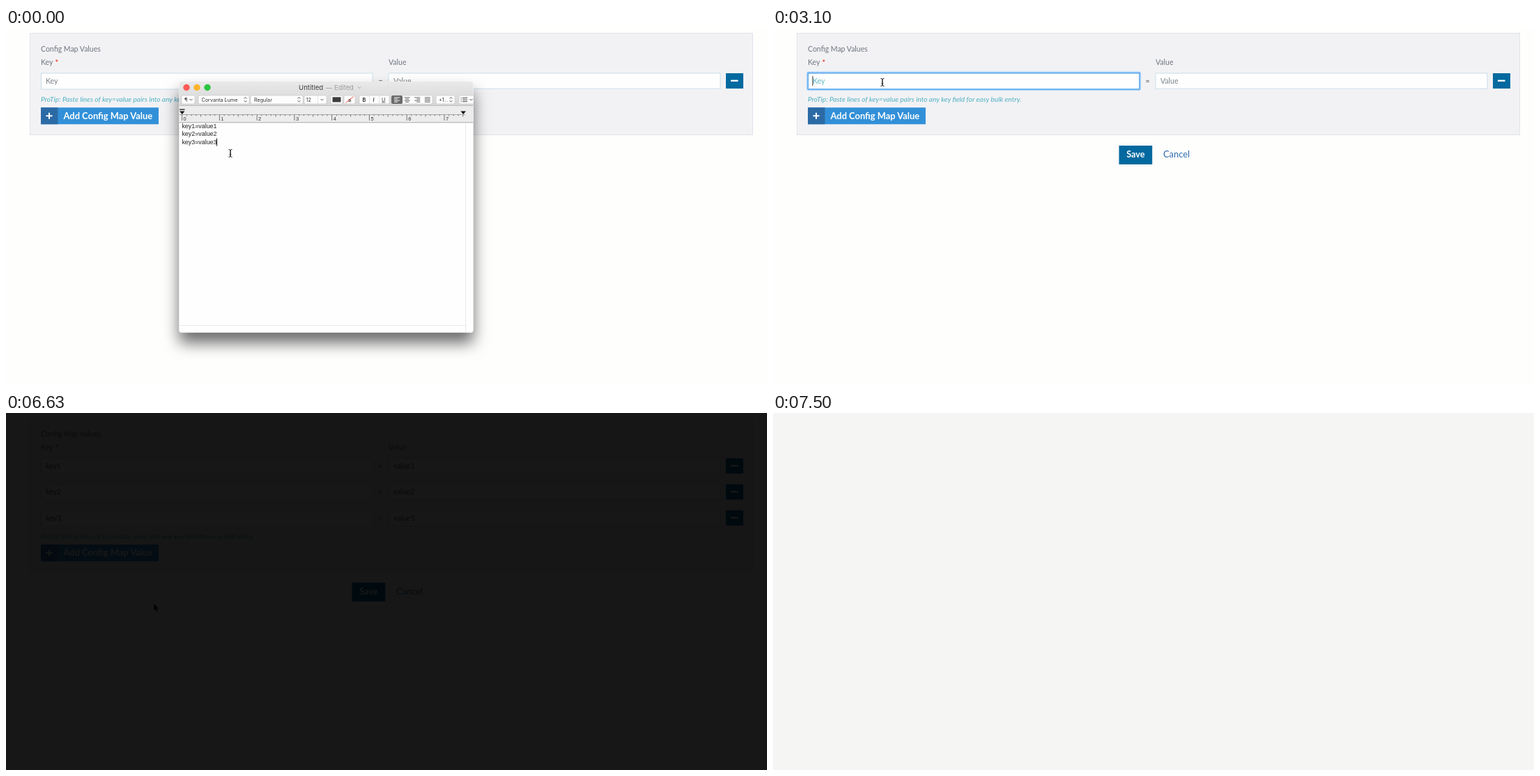
These frames come from a looping animation (1092 px wide and 513 px high, 7530 ms). An HTML page:

```html
<!DOCTYPE html>
<html lang="en">
<head>
<meta charset="utf-8">
<title>Config Map Values</title>
<style>
html, body { margin: 0; width: 100%; height: 100%; overflow: hidden; background: #fefefd; }
svg { display: block; width: 100%; height: 100%; }
text { white-space: pre; }
.web { font-family: Lato, "Open Sans", sans-serif; }
.mac { font-family: Inter, Roboto, sans-serif; }
.doc { font-family: "Liberation Sans", Arial, sans-serif; }
</style>
</head>
<body>
<svg id="stage" viewBox="0 0 1092 513" preserveAspectRatio="none">
  <defs>
    <filter id="winShadow" x="-20%" y="-20%" width="140%" height="150%">
      <feDropShadow dx="0" dy="15" stdDeviation="11" flood-opacity=".58"/>
    </filter>
    <filter id="menuShadow" x="-20%" y="-20%" width="140%" height="150%">
      <feDropShadow dx="0" dy="3" stdDeviation="3" flood-opacity=".3"/>
    </filter>
    <linearGradient id="bar" x1="0" y1="0" x2="0" y2="1">
      <stop offset="0" stop-color="#e9e9e9"/><stop offset="1" stop-color="#d6d6d6"/>
    </linearGradient>
    <clipPath id="winClip"><rect x="248.5" y="77" width="422" height="360.5" rx="4"/></clipPath>
  </defs>
</svg>
<script>
const LOOP = 7530, NS = 'http://www.w3.org/2000/svg';
const stage = document.getElementById('stage');

function el(parent, tag, attrs = {}, content) {
  const e = document.createElementNS(NS, tag);
  for (const k in attrs) e.setAttribute(k, attrs[k]);
  if (content != null) e.textContent = content;
  return parent.appendChild(e);
}
const group = (p, a) => el(p, 'g', a);
const rect = (p, x, y, w, h, fill, more) => el(p, 'rect', { x, y, width: w, height: h, fill, ...more });
const path = (p, d, stroke, width = 1, more) =>
  el(p, 'path', { d, fill: 'none', stroke, 'stroke-width': width, ...more });
const label = (p, cls, x, y, size, fill, str, more) =>
  el(p, 'text', { class: cls, x, y, 'font-size': size, fill, ...more }, str);
const show = (e, on) => e.setAttribute('visibility', on ? 'visible' : 'hidden');
const fade = (e, v) => { e.setAttribute('opacity', v); show(e, v > 0); };
const shift = (e, x, y) => e.setAttribute('transform', `translate(${x} ${y})`);
const clamp = (v, a = 0, b = 1) => Math.min(b, Math.max(a, v));

// ---- web form ----
rect(stage, 0, 0, 1092, 513, '#fefefd');
const panel = rect(stage, 34.5, 7.5, 1037, 146, '#f2f2f5', { stroke: '#dfe4e8' });
const gray = '#6f757e';
label(stage, 'web', 50, 34, 10.5, gray, 'Config Map Values');
label(stage, 'web', 50, 53.3, 10.5, gray, 'Key');
label(stage, 'web', 70.5, 54, 11, '#e8412f', '*', { 'font-weight': 700 });
label(stage, 'web', 549, 53.3, 10.5, gray, 'Value');

const rows = [0, 1, 2].map(i => {
  const g = group(stage, { transform: `translate(0 ${i * 37.4})` });
  const box = { stroke: '#c9dfe8' };
  rect(g, 50.5, 65, 475.5, 23, '#fefefe', box);
  rect(g, 549, 65, 476, 22.3, '#fefefe', box);
  label(g, 'web', 534.5, 79.8, 10.5, '#555', '=');
  rect(g, 1033, 65, 25, 22, '#03699f');
  rect(g, 1040, 74.6, 10.5, 2.3, '#fff');
  return {
    g,
    key: label(g, 'web', 57, 79.8, 10.5, '#555', 'key' + (i + 1)),
    value: label(g, 'web', 556, 80, 10.5, '#555', 'value' + (i + 1))
  };
});
const focus = group(stage);
rect(focus, 49.6, 64, 477, 24.6, 'none', { stroke: '#a9d2fa', 'stroke-width': 3, rx: 1.5 });
rect(focus, 50.3, 64.7, 475.6, 23.2, 'none', { stroke: '#58a6ee', 'stroke-width': 1.3 });
const fieldCaret = rect(stage, 56.4, 69, 1, 14, '#333');

const foot = group(stage);
label(foot, 'web', 50, 105.8, 10.1, '#4fb1c2', 'ProTip: Paste lines of key=value pairs into any key field for easy bulk entry.',
  { 'font-style': 'italic' });
rect(foot, 50, 114.3, 169, 24, '#3290d8');
rect(foot, 50, 114.3, 24.5, 24, '#2c6aa5');
path(foot, 'M57.5 126.3h9M62 121.8v9', '#fff', 2);
label(foot, 'web', 82.5, 130.5, 12.9, '#fff', 'Add Config Map Value', { 'font-weight': 700 });
rect(foot, 496.5, 169, 47.7, 27, '#03699f');
label(foot, 'web', 520.3, 186.4, 12.6, '#fff', 'Save', { 'font-weight': 700, 'text-anchor': 'middle' });
label(foot, 'web', 560, 186.4, 12.9, '#2f6cab', 'Cancel');

// ---- editor window ----
const win = group(stage);
rect(win, 248.5, 77, 422, 360.5, '#fefefe', { rx: 4, filter: 'url(#winShadow)' });
const face = group(win, { 'clip-path': 'url(#winClip)' });
rect(face, 248, 77, 423, 35, 'url(#bar)');
rect(face, 248, 111.5, 423, 24.5, '#ececec');
path(face, 'M248 111.5h423', '#b5b5b5', .8);
path(face, 'M248 135.8h423', '#9a9a9a', .8);
path(face, 'M659.5 136v302M248 427.5h412', '#e3e3e3', .8);
['#fc5b57', '#fdb42c', '#2bc540'].forEach((c, i) =>
  el(face, 'circle', { cx: 259 + i * 15, cy: 85.5, r: 4.7, fill: c }));
label(face, 'mac', 420, 89.2, 9.6, '#3d3d3d', 'Untitled');
label(face, 'mac', 459, 89.2, 9.4, '#9c9c9c', '— Edited');
const chev = (x, y, c = '#444') => path(face, `M${x - 2} ${y - 1}l2 2l2-2`, c, .9);
const updown = x => path(face, `M${x - 1.8} 101.5l1.8-2l1.8 2M${x - 1.8} 104.3l1.8 2l1.8-2`, '#444', .9);
chev(507, 85.5, '#999');

const button = (x, w) => rect(face, x, 97, w, 12, '#fdfdfd', { rx: 2, stroke: '#c6c6c6', 'stroke-width': .6 });
const tool = (x, str, more) => label(face, 'mac', x, 105.7, 7.2, '#333', str, more);
[[252, 19], [276, 73], [351, 75], [428, 32], [466, 17], [485, 16], [507, 43], [553, 59], [617, 27], [650, 25]]
  .forEach(b => button(...b));
tool(256, '¶'); chev(265.5, 103);
tool(280.5, 'Corvanta Lume'); updown(343.5);
tool(356, 'Regular'); updown(420.5);
tool(430.5, '12'); chev(453.5, 103);
path(face, 'M447.5 97v12M521.5 97v12M535.5 97v12', '#d0d0d0', .6);
rect(face, 468.5, 99.3, 12, 7.2, '#3c3c3c');
tool(491, 'a', { 'font-weight': 600 });
path(face, 'M487.5 107.5l11-9', '#e2452f', 1);
tool(511.5, 'B', { 'font-weight': 700 });
tool(526.5, 'I', { 'font-style': 'italic', 'font-weight': 600 });
tool(539, 'U', { 'text-decoration': 'underline' });
rect(face, 553, 97, 16, 12, '#6a6a6a', { rx: 2 });
[0, .5, 1, 0].forEach((a, i) => {
  for (let j = 0; j < 4; j++) {
    const w = j % 2 && i < 3 ? 5 : 8;
    rect(face, 557 + i * 14.6 + (8 - w) * a, 99.5 + j * 2.1, w, .9, i ? '#555' : '#fff');
  }
});
tool(621, '+1...'); updown(638.5);
for (let j = 0; j < 3; j++) {
  rect(face, 652.5, 100 + j * 2.6, 1.2, 1, '#444');
  rect(face, 655, 100 + j * 2.6, 7, 1, '#444');
}
chev(667.5, 103);

path(face, 'M248 124.5h411', '#8a8a8a', .7);
for (let i = 0; i <= 60; i++) {
  const x = 252.6 + i * 6.72, len = i % 8 ? (i % 4 ? 1.8 : 3) : 8.5;
  path(face, `M${x} 124.5v${len}`, '#555', .8);
  if (i % 8 === 0) label(face, 'doc', x + 2, 133, 7.5, '#333', i / 8);
}
path(face, 'M249 117.2h7.5', '#111', 1.3);
el(face, 'path', { d: 'M249 119.5h7.5l-3.7 4.5zM652.4 119.5h7.5l-3.7 4.5z', fill: '#111' });

const marks = [0, 1, 2].map(i => rect(face, 252, 136 + i * 11.2, 0, 11.2, '#a9cefb'));
['key1=value1', 'key2=value2', 'key3=value3'].forEach((s, i) =>
  label(face, 'doc', 252.4, 144.3 + i * 11.1, 8.9, '#222', s));
const docCaret = rect(face, 302, 158.5, 1, 11, '#111');

// ---- context menus: '-' is a separator, trailing '>' a submenu ----
function menu(x, y, w, items) {
  const g = group(stage), spots = {};
  const back = rect(g, x, y, w, 0, '#f3f3f3', { rx: 3.5, stroke: '#c9c9c9', 'stroke-width': .5, filter: 'url(#menuShadow)' });
  const bar = rect(g, x, 0, w, 13.4, '#3b84f7');
  let top = y + 3;
  const entries = [];
  for (const item of items) {
    if (item === '-') {
      rect(g, x, top + 4, w, 1, '#dcdcdc');
      top += 9;
      continue;
    }
    const name = item.replace('>', '');
    const txt = label(g, 'mac', x + 15, top + 10, 9.6, '#222', name);
    if (name !== item) el(g, 'path', { d: `M${x + w - 11} ${top + 3.6}l5 3l-5 3z`, fill: '#444' });
    entries.push({ top, txt });
    top += 13.4;
  }
  back.setAttribute('height', top + 3 - y);
  return {
    g,
    hover(cx, cy) {
      const hit = entries.find(e => cx > x && cy >= e.top && cy < e.top + 13.4);
      show(bar, false);
      for (const e of entries) e.txt.setAttribute('fill', e === hit ? '#fff' : '#222');
      if (hit) { bar.setAttribute('y', hit.top); bar.removeAttribute('visibility'); }
    }
  };
}
const editMenu = menu(264, 141, 217, ['Look Up “key1=value1 key2=value2…”', 'Search the Web', '-',
  'Cut', 'Copy', 'Paste', '-', 'Share>', '-', 'Font>', 'Spelling and Grammar>', 'Substitutions>',
  'Transformations>', 'Speech>', 'Layout Orientation>', '-', 'Make Sticky Note', 'Services>']);
const pageMenu = menu(159, 79, 146, ['Undo', 'Redo', '-', 'Cut', 'Copy', 'Paste', 'Paste and Match Style',
  'Select All', '-', 'Spelling and Grammar>', 'Substitutions>', 'Writing Direction>', '-', 'Inspect', '-', 'Speech>', 'Services>']);

// ---- pointers ----
const arrow = el(stage, 'path', { d: 'M0 0v11l2.5-2.3l1.9 4.2l1.9-.8l-1.9-4.2h3.5z', fill: '#000', stroke: '#fff', 'stroke-width': .8 });
const beam = group(stage);
const beamShape = 'M-2.5-5.5q2.5 0 2.5 1.6v7.8q0 1.6-2.5 1.6M2.5-5.5q-2.5 0-2.5 1.6v7.8q0 1.6 2.5 1.6M-1.3 1.8h2.6';
path(beam, beamShape, '#fff', 2, { opacity: .7 });
path(beam, beamShape, '#222', 1);

const shade = rect(stage, 0, 0, 1092, 513, '#000');
const blank = rect(stage, 0, 0, 1092, 513, '#fefefd');

// time, x, y of the pointer
const route = [
  [400, 322, 180], [600, 304, 165], [650, 304, 165], [900, 251, 134],
  [1030, 251, 134], [1200, 260, 138], [1700, 260, 138], [1930, 290.5, 197.5],
  [2099, 290.5, 197.5], [2100, 291, 198], [2630, 291, 198], [3000, 157, 78],
  [3530, 157, 78], [4000, 190, 150], [4230, 190, 150], [4430, 212, 273.5]
];
function pointer(t) {
  const i = route.findIndex(p => p[0] > t);
  if (i < 0) return route[route.length - 1].slice(1);
  if (i === 0) return route[0].slice(1);
  const [t0, x0, y0] = route[i - 1], [t1, x1, y1] = route[i];
  const u = (t - t0) / (t1 - t0), k = u * u * (3 - 2 * u);
  return [x0 + (x1 - x0) * k, y0 + (y1 - y0) * k];
}
const span = (t, a, b) => t >= a && t < b;
const menuAlpha = (t, open, close, end) =>
  t < open ? 0 : t < close ? 1 : clamp(1 - (t - close) / (end - close));

function draw(t) {
  const [x, y] = pointer(t);
  const front = t < 3030, pasted = t >= 4230, focused = !front && !pasted;

  rows.forEach((r, i) => show(r.g, i === 0 || pasted));
  rows[0].key.textContent = pasted ? 'key1' : 'Key';
  rows[0].key.setAttribute('fill', pasted ? '#555' : focused ? '#5fb7c6' : '#7b8188');
  rows[0].value.textContent = pasted ? 'value1' : 'Value';
  rows[0].value.setAttribute('fill', pasted ? '#555' : '#7b8188');
  panel.setAttribute('height', pasted ? 221 : 146);
  shift(foot, 0, pasted ? 74.8 : 0);
  show(focus, focused);
  show(fieldCaret, span(t, 3030, 3560));

  show(win, front);
  show(docCaret, t < 260);
  const line = clamp(Math.floor((y - 136) / 11.2), 0, 2);
  marks.forEach((m, i) => {
    const end = i < 2 ? 656 : 303;
    const from = t >= 900 || i > line ? 252 : i < line ? end : clamp(x, 252, end);
    m.setAttribute('x', from);
    m.setAttribute('width', t < 650 ? 0 : end - from);
  });

  fade(editMenu.g, menuAlpha(t, 1360, 2260, 2470));
  fade(pageMenu.g, menuAlpha(t, 3330, 4160, 4300));
  editMenu.hover(t < 1730 ? 0 : x, t > 1930 ? 198 : y);
  pageMenu.hover(t < 3560 ? 0 : x, t > 4000 ? 150 : y);

  const onText = t < 1100 || span(t, 2980, 3530) || (span(t, 2500, 3000) && x > 249 && y > 170);
  show(beam, onText);
  show(arrow, !onText);
  shift(onText ? beam : arrow, x, y);

  fade(shade, t < 5890 ? 0 : t < 6700 ? clamp((t - 5870) / 835, 0, .91) : 1);
  fade(blank, t < 6700 ? 0 : Math.max(0, Math.floor((t - 6693) / 66.67)) * .0804);
}

const start = performance.now();
function tick(now) {
  draw(Math.max(0, now - start) % LOOP);
  requestAnimationFrame(tick);
}
draw(0);
requestAnimationFrame(tick);
</script>
</body>
</html>
```
